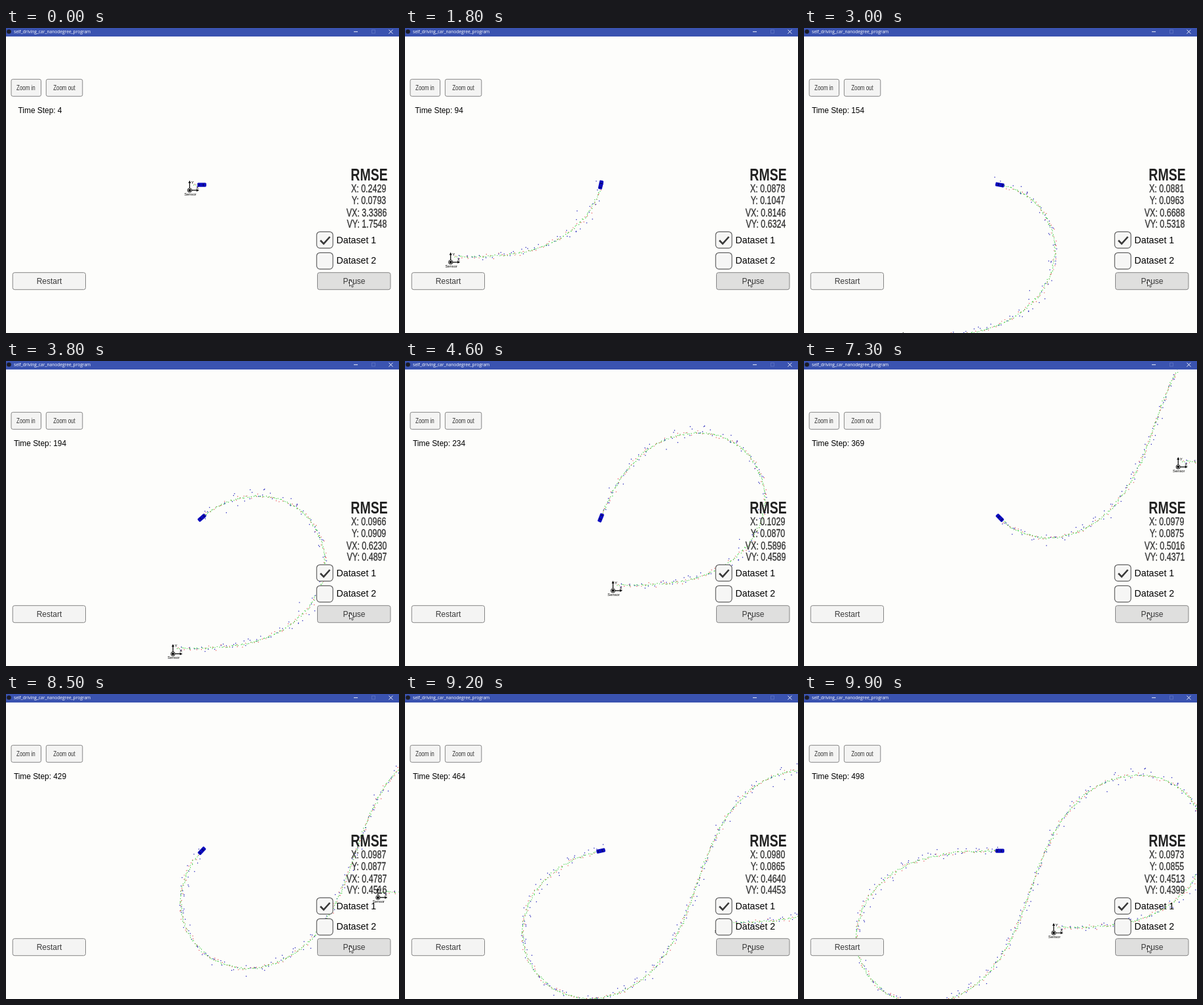
Recreate the animation shown at these times as an HTML page. Size 600 by 466 pixels, loop 10 s.

```html
<!DOCTYPE html>
<html lang="en">
<head>
<meta charset="utf-8">
<title>Tracking simulator</title>
<style>
  html, body { margin: 0; width: 100%; height: 100%; overflow: hidden; background: #fdfdfb; }
  svg { display: block; width: 100%; height: 100%; font-family: "Liberation Sans", Arial, sans-serif; }
  .dots path { fill: none; stroke-linecap: round; }
  .button { fill: #f4f4f3; stroke: #858585; stroke-width: 1; }
  .box { fill: #f6f6f5; stroke: #626262; stroke-width: 1.2; }
  .mid { text-anchor: middle; }
  .end { text-anchor: end; }
  .label { font-size: 12px; fill: #3a3a3a; }
</style>
</head>
<body>
<svg viewBox="0 0 600 466">
  <rect width="600" height="466" fill="#fdfdfb"/>

  <g id="world">
    <g class="dots">
      <path id="lidar" stroke="#e65050" stroke-width="1.4"/>
      <path id="radar" stroke="#2222b8" stroke-width="1.5"/>
      <path id="estimate" stroke="#3fcf3f" stroke-width="1.4"/>
    </g>
    <g stroke="#000" stroke-width="1.2">
      <path d="M0 0V-13M0 0H12" fill="none"/>
      <path d="M0 -15l2 4h-4zM14.5 0l-4 -2v4z" stroke="none"/>
      <circle r="3.2" fill="#fdfdfb" stroke-width=".9"/>
      <circle r="2" stroke="none"/>
    </g>
    <text x="4.5" y="-10" class="mid" font-size="6">Y</text>
    <text x="12" y="-2" class="mid" font-size="6">X</text>
    <text x="1" y="8" class="mid" font-size="5.8">Sensor</text>
  </g>

  <g id="car">
    <rect x="-6.8" y="-3.1" width="13.6" height="6.2" rx="1.6" fill="#0c0cbe"/>
    <path d="M2.2 -1.8v3.6M-4 -1.6v3.2" stroke="#050540" stroke-width="1"/>
  </g>

  <rect width="600" height="13" fill="#3a53b0"/>
  <circle cx="4.5" cy="5.5" r="3.3" fill="#1c1c24"/>
  <text x="12" y="8" font-size="6.64" fill="#fff" style="font-family:'Open Sans','Noto Sans',sans-serif">self_driving_car_nanodegree_program</text>
  <g fill="none" stroke="#fff" stroke-width=".9">
    <path d="M531 5.7h6M584.5 2.7l6 6m0 -6l-6 6"/>
    <rect x="558.5" y="3" width="5" height="5" stroke="#5c72c2"/>
  </g>

  <rect class="button" x="8" y="78.3" width="45.5" height="26" rx="2.5"/>
  <rect class="button" x="61.3" y="78.3" width="55.5" height="26" rx="2.5"/>
  <rect class="button" x="10.2" y="373.7" width="111.3" height="26" rx="3"/>
  <rect class="button" x="475.5" y="373.7" width="111.5" height="26" rx="3" style="fill:#dfdfde"/>
  <text class="mid label" x="66" y="391">Restart</text>
  <text class="mid label" x="531.5" y="391">Pause</text>
  <text class="mid" id="clock" x="52" y="130" font-size="11.9"></text>

  <rect class="box" x="474.3" y="311.3" width="24.8" height="25" rx="5"/>
  <rect class="box" x="474.3" y="343.3" width="24.8" height="25" rx="5"/>
  <path d="M480 324.5l5 5.2L494.5 319" fill="none" stroke="#383838" stroke-width="2.6"/>
  <text x="504.5" y="329" font-size="14.2">Dataset 1</text>
  <text x="504.5" y="360" font-size="14.2">Dataset 2</text>

  <!-- The interface's condensed lettering shares one horizontal scale. -->
  <g transform="scale(.78 1)" fill="#333">
    <text class="mid" x="39" y="95" font-size="10.2">Zoom in</text>
    <text class="mid" x="114" y="95" font-size="10.2">Zoom out</text>
    <text class="end" x="747" y="232.7" font-size="25" font-weight="bold" fill="#222">RMSE</text>
    <g id="errors" class="end" font-size="16" stroke="#333" stroke-width=".35">
      <text x="744" y="251"></text>
      <text x="744" y="269"></text>
      <text x="745.5" y="288"></text>
      <text x="745.5" y="305"></text>
    </g>
  </g>

  <path d="M524.5 384.5v10l2.3 -2l1.6 3.6l1.7 -.8l-1.6 -3.4h3z" fill="#fff" stroke="#222" stroke-width=".8"/>
</svg>

<script>
const $ = id => document.getElementById(id);
const FRAME_MS = 100, FRAMES = 100, LAST_STEP = 498;
const CAR = { x: 299, y: 240 };
const PX_PER_M = 11.36, DT = .05, PERIOD = 500;

// The car's yaw rate swings as a sine over one period, its speed as a cosine at twice that rate.
const MAX_YAW_RATE = .55;
const phase = step => 2 * Math.PI * step / PERIOD;
const yaw = step => MAX_YAW_RATE * DT * PERIOD / (2 * Math.PI) * (1 - Math.cos(phase(step)));
const speed = step => 5 + .2 * Math.cos(2 * phase(step));

// Position in metres from the sensor at every step.
const route = [{ x: .6, y: .7 }];
for (let s = 0; s < LAST_STEP; s++) {
  const d = speed(s + .5) * DT, a = yaw(s + .5);
  route.push({ x: route[s].x + d * Math.cos(a), y: route[s].y + d * Math.sin(a) });
}

let seed = 7;
function random() {
  seed = (seed * 16807) % 2147483647;
  return seed / 2147483647;
}
const noise = sd => (random() + random() + random() - 1.5) * 2 * sd;
const dot = (x, y) => `M${(x * PX_PER_M).toFixed(1)} ${(-y * PX_PER_M).toFixed(1)}h.01`;

// Lidar and radar readings alternate; radar errs in range and bearing.
const marks = route.map(({ x, y }, s) => {
  const mark = { estimate: dot(x + noise(.07), y + noise(.07)), lidar: '', radar: '' };
  if (s % 2 === 0) {
    mark.lidar = dot(x + noise(.15), y + noise(.15));
  } else {
    const range = Math.hypot(x, y) + noise(.3), bearing = Math.atan2(y, x) + noise(.03);
    mark.radar = dot(range * Math.cos(bearing), range * Math.sin(bearing));
  }
  return mark;
});

// Key readings of the error display: step, then X, Y, VX, VY.
const readings = [
  [4, .2429, .0793, 3.3386, 1.7548],
  [94, .0878, .1047, .8146, .6324],
  [154, .0881, .0963, .6688, .5318],
  [234, .1029, .0870, .5896, .4589],
  [309, .0969, .0873, .5308, .4186],
  [429, .0987, .0877, .4787, .4516],
  [498, .0973, .0855, .4513, .4399]
];

// Between readings the errors settle with the inverse root of the step count.
function errorsAt(step) {
  const next = Math.max(1, readings.findIndex(r => r[0] >= step));
  const [from, ...a] = readings[next - 1], [to, ...b] = readings[next];
  const settle = s => 1 / Math.sqrt(s);
  const u = (settle(step) - settle(from)) / (settle(to) - settle(from));
  return a.map((value, i) => value + (b[i] - value) * u);
}

function draw(step) {
  const { x, y } = route[step];
  const heading = -yaw(step) * 180 / Math.PI;
  $('world').setAttribute('transform',
    `translate(${CAR.x - x * PX_PER_M} ${CAR.y + y * PX_PER_M})`);
  $('car').setAttribute('transform', `translate(${CAR.x} ${CAR.y - .4}) rotate(${heading})`);
  const seen = marks.slice(0, step + 1);
  for (const kind of ['estimate', 'lidar', 'radar'])
    $(kind).setAttribute('d', seen.map(m => m[kind]).join(''));
  $('clock').textContent = `Time Step: ${step}`;
  const names = ['X', 'Y', 'VX', 'VY'];
  errorsAt(step).forEach((value, i) => {
    $('errors').children[i].textContent = `${names[i]}: ${value.toFixed(4)}`;
  });
}

const start = performance.now();
let shown = -1;
function tick() {
  const frame = Math.floor((performance.now() - start) / FRAME_MS) % FRAMES;
  if (frame !== shown) {
    shown = frame;
    draw(Math.min(LAST_STEP, 4 + 5 * frame));
  }
  requestAnimationFrame(tick);
}
tick();
</script>
</body>
</html>
```
